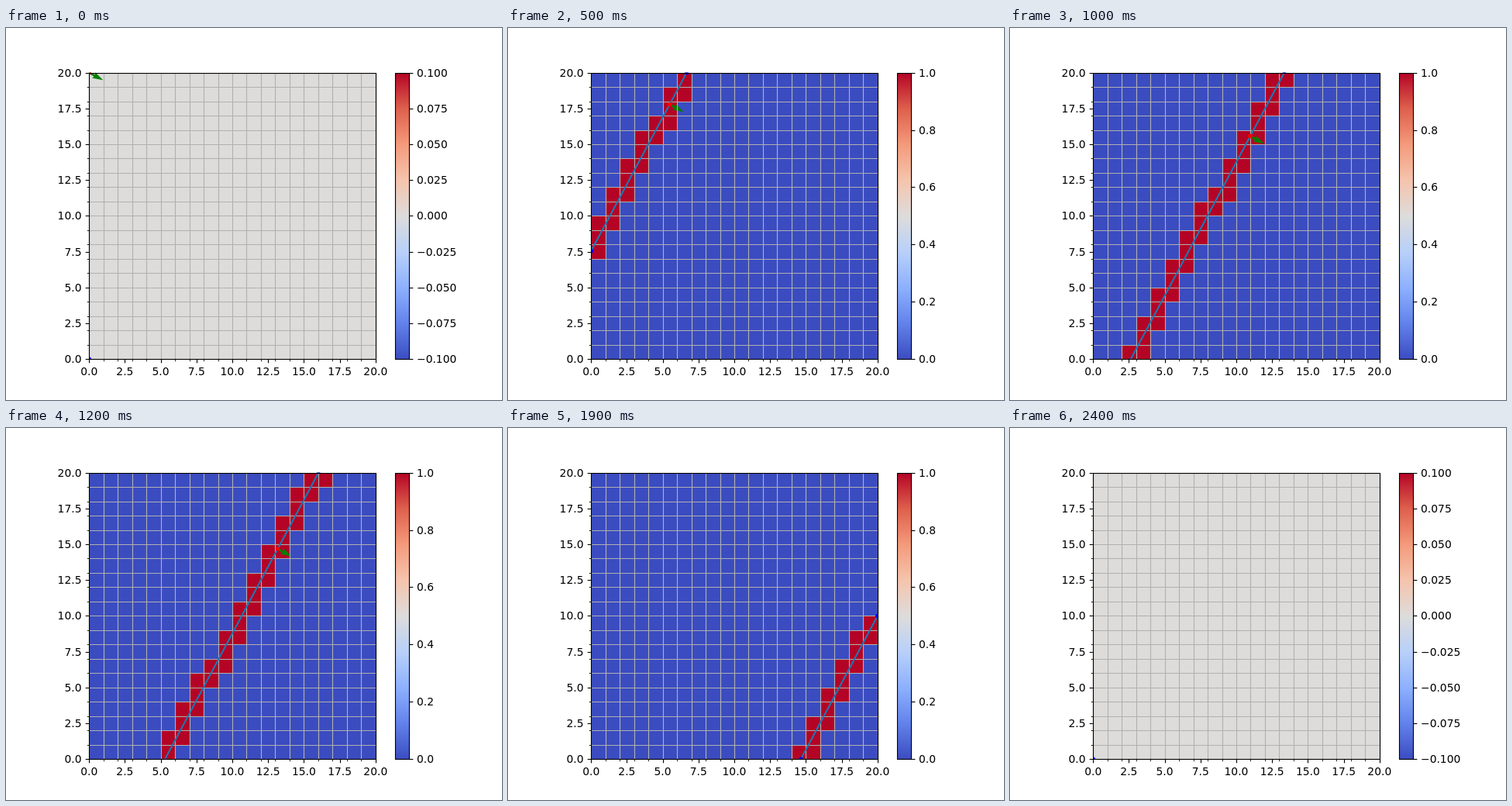
These frames come from a looping animation (640x480 px, 3000 ms). An HTML page:

```html
<!DOCTYPE html>
<html lang="en">
<head>
<meta charset="utf-8">
<title>Line sweep over a grid</title>
<style>
  html, body { margin: 0; width: 100%; height: 100%; overflow: hidden; background: #fff; }
  svg { display: block; width: 640px; height: 480px; }
  text { font: 13.89px "DejaVu Sans", Verdana, sans-serif; fill: #000; }
</style>
</head>
<body>
<svg id="plot" viewBox="0 0 640 480">
  <defs>
    <clipPath id="box"><rect x="107.2" y="57.6" width="369.6" height="369.6"/></clipPath>
    <linearGradient id="warm" x1="0" y1="1" x2="0" y2="0"></linearGradient>
  </defs>
  <rect width="640" height="480" fill="#fff"/>
  <g id="cells"></g>
  <g id="arrow" clip-path="url(#box)"></g>
  <g id="grid" stroke="#b0b0b0" stroke-width="1.11"></g>
  <g id="marks" clip-path="url(#box)"></g>
  <rect x="502" y="58" width="18.5" height="369.5" fill="url(#warm)"/>
  <g id="axes" stroke="#000" fill="none"></g>
  <g id="labels"></g>
  <g id="scale"></g>
</svg>
<script>
const N = 20, UNIT = 18.48, LEFT = 107.2, BOTTOM = 427.2;
const STEP_MS = 100, LOOP_MS = 3000, LAST = 24;
const TOP_STEP = 1.335;   // how far the line moves along the top edge per step
const SLOPE = 1.866;
const PROBE_STEP = 1.097; // how far the red point moves in x per step

const el = id => document.getElementById(id);
const px = x => LEFT + UNIT * x;
const py = y => BOTTOM - UNIT * y;
const snap = v => Math.floor(v + 0.5) + 0.5;
const edge = v => Math.floor(v + 0.5);
const range = n => Array.from({ length: n }, (_, i) => i);
const seg = (x1, y1, x2, y2, w) =>
  `<line x1="${x1}" y1="${y1}" x2="${x2}" y2="${y2}"${w ? ` stroke-width="${w}"` : ''}/>`;
const label = (x, y, s, anchor) => `<text x="${x}" y="${y}" text-anchor="${anchor}">${s}</text>`;
const dot = (x, y, color) => `<circle cx="${px(x)}" cy="${py(y)}" r="2.8" fill="${color}"/>`;

function drawStatic() {
  const stops = ['59,76,192', '98,130,234', '141,176,254', '184,208,249', '221,220,219',
    '245,196,173', '244,154,123', '222,96,77', '180,4,38'];
  el('warm').innerHTML = stops.map((c, i) =>
    `<stop offset="${i / 8}" stop-color="rgb(${c})"/>`).join('');

  const x0 = snap(LEFT), x1 = snap(px(N)), y0 = snap(BOTTOM), y1 = snap(py(N));
  let grid = '', axes = '', labels = '';
  for (let i = 0; i <= N; i++) {
    const x = snap(px(i)), y = snap(py(i));
    grid += seg(x, y1, x, y0) + seg(x0, y, x1, y);
    if (i % 5) axes += seg(x, y0, x, y0 + 2.78, 0.83) + seg(x0 - 2.78, y, x0, y, 0.83);
  }
  for (let v = 0; v <= N; v += 2.5) {
    const x = snap(px(v)), y = snap(py(v));
    axes += seg(x, y0, x, y0 + 4.86, 1.11) + seg(x0 - 4.86, y, x0, y, 1.11);
    labels += label(px(v), 448, v.toFixed(1), 'middle') +
      label(97.5, edge(py(v) + 5), v.toFixed(1), 'end');
  }
  const frame = (x, w) =>
    `<rect x="${x}" y="${y1}" width="${w}" height="${y0 - y1}" stroke-width="1.11"/>`;
  el('grid').innerHTML = grid;
  el('axes').innerHTML = axes + frame(x0, x1 - x0) + frame(502.5, 18);
  el('labels').innerHTML = labels;
}

function scaleTicks(active) {
  const count = active ? 5 : 8;
  return range(count + 1).map(i => {
    const y = py(N * i / count);
    const v = active ? i / 5 : (i - 4) / 40;
    const text = (v < 0 ? '\u2212' : '') + Math.abs(v).toFixed(active ? 1 : 3);
    return `<g stroke="#000">${seg(520.5, snap(y), 525.4, snap(y), 1.11)}</g>` +
      label(530, edge(y + 5), text, 'start');
  }).join('');
}

function block(x, y, w, h, color) {
  const l = edge(px(x)), t = edge(py(y + h));
  return `<rect x="${l}" y="${t}" width="${edge(px(x + w)) - l}" height="${edge(py(y)) - t}" fill="${color}"/>`;
}

// Cells of every column that the line runs through.
function hitCells(lineY) {
  let out = '';
  for (let c = 0; c < N; c++) {
    const low = Math.max(0, Math.floor(lineY(c)));
    const high = Math.min(N, Math.ceil(lineY(c + 1)));
    if (high > low) out += block(c, low, 1, high - low, 'rgb(180,4,38)');
  }
  return out;
}

function arrowAt(x, y) {
  const angle = Math.atan(1 / SLOPE) * 180 / Math.PI;
  return `<path fill="#008000" transform="translate(${px(x)} ${py(y)}) rotate(${angle})"
    d="M0-1.39H8V-1.39L6.6-4.16L20.5 0L6.6 4.16L8 1.39H0Z"/>`;
}

function drawStep(k) {
  const top = TOP_STEP * k;
  const lineY = x => N - (top - x) * SLOPE;
  const lineX = y => top - (N - y) / SLOPE;
  const active = k > 0 && k < LAST;
  const probeX = PROBE_STEP * k, probeY = lineY(probeX);
  let marks = '';

  if (active) {
    const startY = Math.max(0, lineY(0)), endY = Math.min(N, lineY(N));
    const startX = lineX(startY), endX = lineX(endY);
    marks = `<line x1="${px(startX)}" y1="${py(startY)}" x2="${px(endX)}" y2="${py(endY)}"
      stroke="#1f77b4" stroke-width="2.08" stroke-linecap="square"/>`;
    if (startY > 0 || endY < N - 0.1) {
      marks += dot(startX, startY, '#00f') + dot(endX, endY, '#00f');
    } else if (endY === N) {
      marks += dot(endX, N + 0.1, '#00f');
    }
  } else {
    marks = dot(0, 0, '#00f');
  }
  marks += dot(probeX, probeY, '#f00');

  el('cells').innerHTML = block(0, 0, N, N, active ? 'rgb(59,76,192)' : 'rgb(221,220,219)') +
    (active ? hitCells(lineY) : '');
  el('arrow').innerHTML = arrowAt(probeX, probeY);
  el('marks').innerHTML = marks;
  el('scale').innerHTML = scaleTicks(active);
}

let shown = -1;
const start = performance.now();
function tick() {
  const t = (performance.now() - start) % LOOP_MS;
  const k = Math.min(LAST, Math.floor(t / STEP_MS));
  if (k !== shown) drawStep(shown = k);
  requestAnimationFrame(tick);
}
drawStatic();
tick();
</script>
</body>
</html>
```
